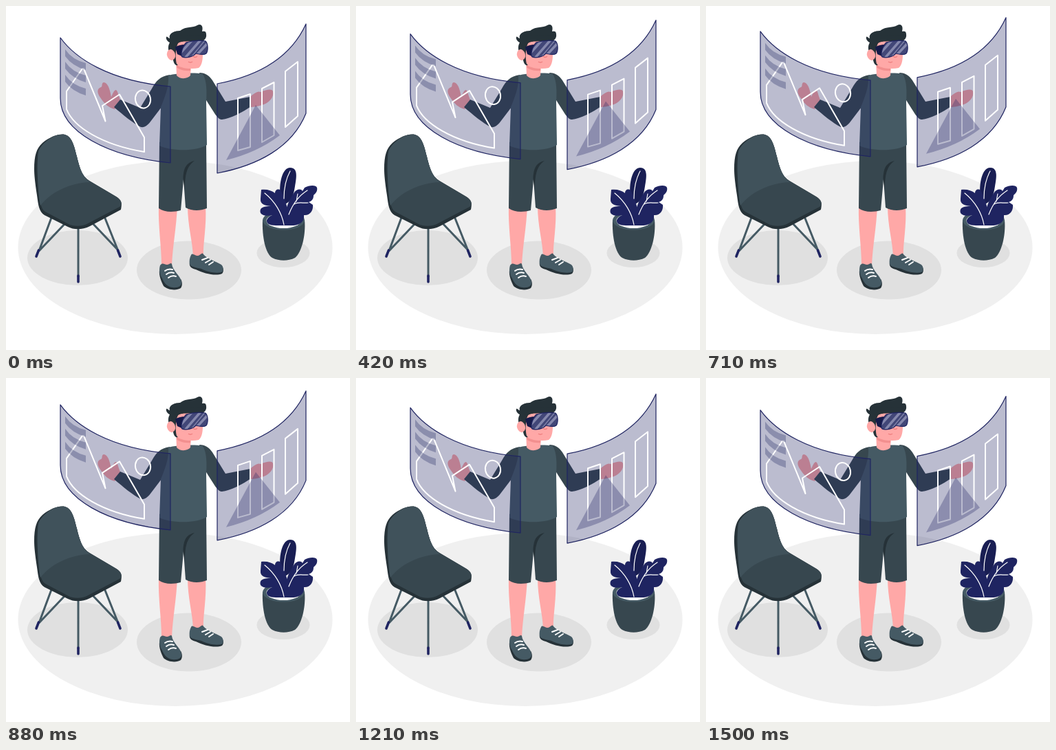
Write an HTML page that moves like this. It is 500 px wide and 500 px high and loops after 1.54 s.

```html
<!DOCTYPE html>
<html lang="en">
<head>
<meta charset="utf-8">
<title>Floating VR screens</title>
<style>
  html, body { margin: 0; width: 100%; height: 100%; overflow: hidden; background: #fff; }
  svg { display: block; width: 100%; height: 100%; }
  .slate { fill: #455a64; }
  .dark { fill: #37474f; }
  .ink { fill: #263238; }
  .skin { fill: #ffa8a7; }
  .navy { fill: #1f2461; }
  .shadow { fill: #e0e0e0; }
  .line { fill: none; stroke: #fff; stroke-width: 2; stroke-linejoin: round; stroke-linecap: round; }
  .thin { stroke-width: 1.2; }
  .glass { fill: #1f2461; fill-opacity: .3; stroke: #1f2461; stroke-width: 1.2; stroke-linejoin: round; }
  .tint { fill: #1f2461; fill-opacity: .3; }
</style>
</head>
<body>
<svg viewBox="0 0 500 500">
  <defs>
    <path id="visor" d="M262 53C272 50 284 50 290 51C294 55 294 65 291 69C287 72 281 70 276 69C272 74 262 76 256 74C253 70 257 58 262 53Z"/>
    <clipPath id="lens"><use href="#visor"/></clipPath>
    <path id="stripe" d="M86 63Q96 78 116 83V93Q96 87 86 73Z"/>
  </defs>

  <ellipse cx="246" cy="351" rx="228.500" ry="126" fill="#f0f0f0"/>
  <g class="shadow">
    <ellipse cx="104" cy="366" rx="73" ry="40"/>
    <ellipse cx="266" cy="384" rx="76" ry="42.500"/>
    <ellipse cx="403" cy="359" rx="38.500" ry="21"/>
  </g>

  <g id="chair">
    <g fill="none" stroke="#455a64" stroke-width="3">
      <path d="M67 305L48 356M86 316L48 356M105 320V394M143 306L163 356M126 316L163 355"/>
      <path d="M47.500 355L44 364M105 392V401M162.500 355L166 364" stroke="#1f2461" stroke-width="3.600" stroke-linecap="round"/>
    </g>
    <path class="ink" d="M41 237C41 218 44 207 53 199C65 189 78 185 86 187C96 190 99 203 103 219C108 240 112 248 121 254L160 277C168 282 169 286 167 296L122 320C110 326 98 325 90 321L56 304C48 299 47 290 45 275C42 255 41 245 41 237Z"/>
    <path class="dark" d="M47 212C51 200 70 185 85 187C96 190 99 203 103 219C108 240 112 248 121 254L160 277C168 282 170 288 165 292L121 315C111 321 99 321 91 317L57 299C50 295 49 282 47 262C45 240 45 225 47 212Z"/>
    <path fill="#40525b" d="M47 212C51 200 70 185 85 187C96 190 99 203 103 219C108 240 112 248 122 256C91 257 64 272 50 290C47 275 44 236 47 212Z"/>
  </g>

  <g id="plant">
    <path class="dark" d="M373 311C372 335 377 360 387 366C397 371 410 371 420 366C430 358 436 332 434 311Z"/>
    <ellipse class="slate" cx="403.500" cy="311.500" rx="30.500" ry="14"/>
    <ellipse cx="403.500" cy="312" rx="25" ry="11" fill="#fff"/>
    <path fill="#191e53" d="M399 281C396 256 402 235 413 235C425 235 422 250 420 262C418 276 414 286 404 288Z"/>
    <path class="navy" d="M371 267C379 266 386 268 391 272C391 267 396 265 399 268C405 278 412 298 412 319H392C383 319 378 316 379 311C381 307 384 305 387 304C378 306 370 304 369.500 299C369 292 376 291 385 291C376 290 369 288 370 280Z"/>
    <path class="navy" d="M452 264C451 260 441 260 434 264L431 269C429 265 422 266 419 271C411 281 404 300 403 319H418C428 318 434 313 433 304C441 305 447 298 446 289L440 285C446 283 447 279 447 275C451 272 453 268 452 264Z"/>
    <path class="line thin" d="M404 280C404 263 408 249 413 240M376 272C391 284 401 301 404 318M438 268C425 276 416 290 411 303M424 273L422 284M419 288C425 284 432 287 439 286"/>
  </g>

  <g id="person">
    <path class="skin" d="M222 290H249C248 320 242 350 241 378L226 376C226 350 221 320 222 290ZM264 290H290C292 320 286 345 287 364L272 364C271 340 264 320 264 290Z"/>
    <path class="ink" d="M223 384C222 392 226 401 229 407C235 413 248 414 254 410C257 406 256 400 254 397ZM267 372C266 378 268 381 276 383C288 389 305 393 314 389C317 386 316 381 314 378Z"/>
    <path class="slate" d="M224 377C228 372 230 376 234 376C237 376 240 372 241 375C242 385 254 392 255 401C256 407 250 410 242 409C234 408 230 403 227 396C223 390 222 384 224 377ZM269 362C271 358 274 363 279 363C283 362 285 357 287 361C293 368 305 371 313 376C317 380 316 386 313 387C304 389 292 386 284 382C276 380 268 379 267 375C266 370 267 366 269 362Z"/>
    <path class="line" d="M231 385C235 382 238 382 242 383M233 390C237 387 241 387 244 388M236 395C240 392 244 392 247 393M285 369L293 366M290 373L297 369M295 376L301 372"/>
    <path class="dark" d="M223 198L222 294C230 300 243 300 254 297L258 252L261 293C270 298 282 298 292 294L291 198Z"/>
    <path class="ink" d="M274 225C262 228 258 235 257.500 251L260 267C260 247 262 233 274 225Z"/>

    <path class="skin" d="M167 138C163 131 163 124 160 122C157 122 155 128 153 132C152 126 149 111 142 111C138 112 141 117 138 118C132 120 132 126 137 133C143 142 149 148 158 150ZM354 133C360 127 366 123 370 125C379 121 387 120 388 124C390 133 382 141 372 144C366 146 360 147 355 147Z"/>
    <path class="dark" d="M238 100C224 102 218 109 212 120L195 148L166 136L157 147C170 158 184 170 196 176C202 177 206 173 210 168L226 147L240 110ZM281 97C290 97 295 101 300 108L319 139L355 132L356 146C345 154 325 164 314 165C308 165 305 159 288 132Z"/>
    <path class="slate" d="M236 101C245 98 275 96 286 99C292 108 292 125 291 140L292 202C275 212 240 211 223 203L225 147C231 132 237 118 236 101Z"/>

    <path class="skin" d="M247 78L248 101C253 107 264 106 268 101L269 86Z"/>
    <path class="ink" d="M233 45C234 43 236 47 238 47C236 39 246 36 253 36C262 29 272 32 278 28C284 25 287 30 285 37C289 36 291 37 291 41C292 47 288 50 284 52L262 57L256 66L249 87C244 85 242 80 243 70L237 66C235 61 236 57 238 53C235 52 232 48 233 45Z"/>
    <path class="skin" d="M250 54C256 50 270 52 286 51L286 70C286 80 284 87 280 90C270 92 256 91 248 84C246 76 246 62 250 54Z"/>
    <ellipse class="skin" cx="240" cy="71" rx="6" ry="8" transform="rotate(-15 240 71)"/>
    <path fill="#f28f8f" d="M248 86C255 90 262 91 268 91V94C259 95 251 92 248 89Z"/>
    <path d="M265 81Q268 83 271 81M272 73Q275 76 278 73" fill="none" stroke="#ed7d7d" stroke-width="1.400"/>
    <path class="ink" d="M248 61C247 55 252 51 259 51C270 49 284 53 288 48L286 42L252 43L243 58Z"/>
    <path class="skin" d="M250 57C252 52 257 51 261 53L257 58Z"/>
    <path fill="#161a49" d="M246 60C250 57 255 56 260 56L258 74L249 70Z"/>
    <g clip-path="url(#lens)" stroke="#8588ad">
      <path fill="#424778" stroke="none" d="M240 40H300V80H240Z"/>
      <path d="M252 70L272 48M259 77L284 48M272 77L295 52" stroke-width="3.600"/>
      <path d="M267 77L290 49" stroke-width="1.300"/>
    </g>
    <use href="#visor" fill="none" stroke="#1f2461" stroke-width="1.200"/>
  </g>

  <g id="screens">
    <path class="glass" d="M79 46C100 75 148 109 239 117V228C148 219 79 183 79 134Z"/>
    <path class="glass" d="M307 113C365 102 413 77 436 26V156C416 206 365 232 307 243Z"/>
    <path class="line" d="M111 91L88 124V150C98 176 140 202 201 212V191L165 128.500L140 145L144.500 167.500L113 91"/>
    <ellipse class="line" cx="199" cy="135.500" rx="11" ry="13" transform="rotate(-12 199 135.500)"/>
    <path class="line" d="M337 134L355 128V205L337 210ZM372 120L389.500 111V188L372 198ZM406 95L424 81V160L406 176Z"/>
    <g class="tint">
      <use href="#stripe"/>
      <use href="#stripe" y="18"/>
      <use href="#stripe" y="37"/>
      <path d="M363 144L398 188Q365 213 320 224Z"/>
    </g>
  </g>
</svg>
<script>
  const LOOP = 1540, STEPS = 37, STEP = 1000 / 24, RISE = 10, LEAD = 1.4;
  const screens = document.getElementById('screens');

  // Height of a linear up-and-down float at a given step.
  const lift = step => {
    const phase = ((step + LEAD) / STEPS) % 1;
    return RISE * (1 - Math.abs(1 - 2 * phase));
  };

  const start = performance.now();
  function draw(now) {
    const time = Math.max(0, now - start) % LOOP;
    const step = Math.floor((time + 4.5) / STEP) % STEPS;
    screens.setAttribute('transform', `translate(0 ${(lift(0) - lift(step)).toFixed(2)})`);
    requestAnimationFrame(draw);
  }
  draw(start);
</script>
</body>
</html>
```
